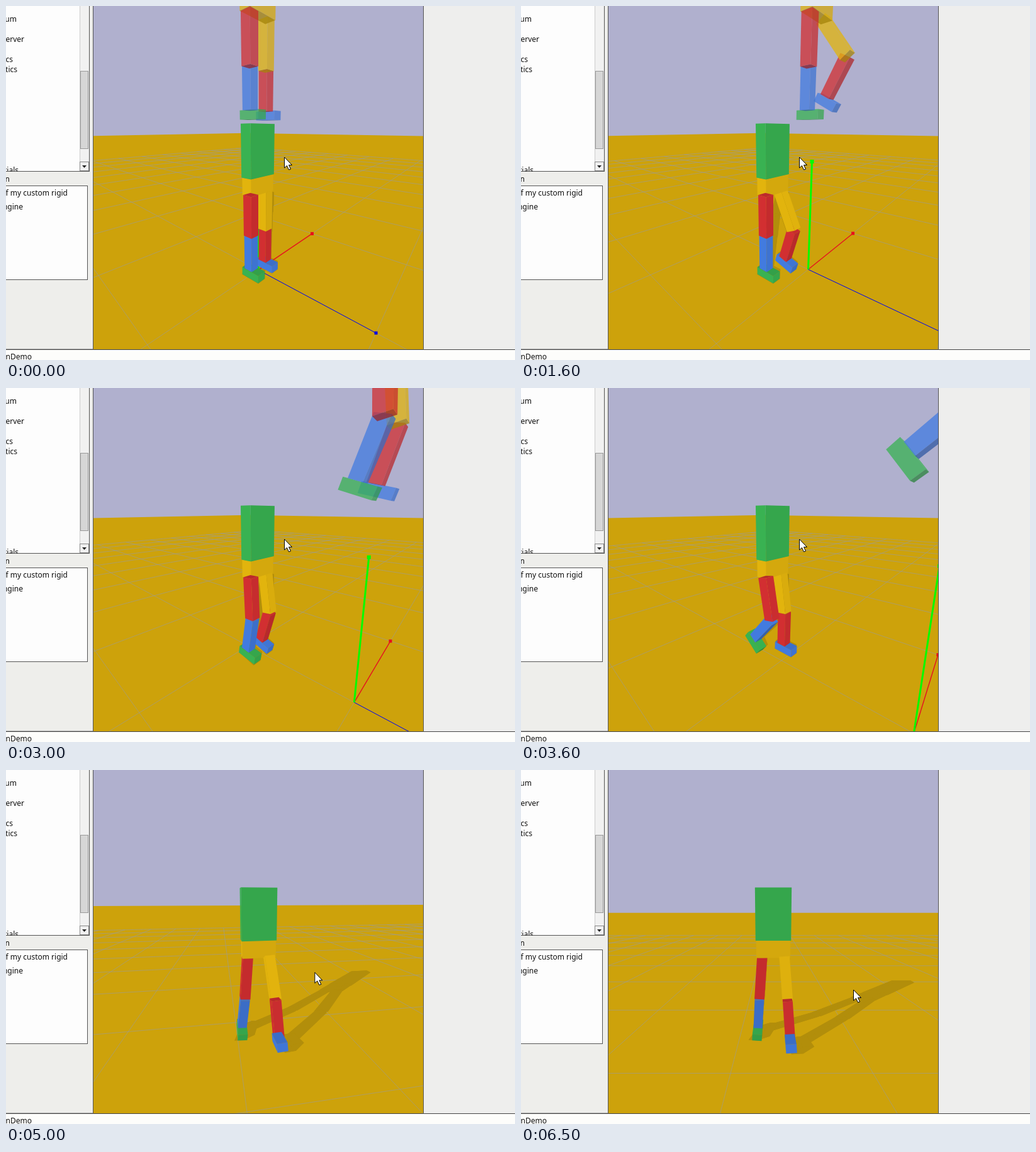
An HTML page with a canvas for the animation above (6600 ms loop, 809 px wide and 562 px high).

```html
<!DOCTYPE html>
<html lang="en">
<head>
<meta charset="utf-8">
<title>Walker simulation</title>
<style>
html, body { margin: 0; width: 100%; height: 100%; overflow: hidden; background: #eeeeeb; }
canvas { display: block; }
</style>
</head>
<body>
<canvas id="stage" width="809" height="562"></canvas>
<script>
const ctx = document.getElementById('stage').getContext('2d');
const RED = [203, 45, 47], BLUE = [64, 119, 216], GREEN = [55, 172, 79], YELLOW = [219, 174, 13];
const FOCAL = 365, NEAR = .3, LAST = 62, RAD = Math.PI / 180;
const GHOST_HEIGHT = 1.34;
const LIGHT = [-.71, .45, .54];

// Key points, each led by its step number: camera yaw, pitch and pointer; walker x and z.
const VIEW = [[35, 48.3, 11.9, 442, 240], [41, 28, 13.9, 415, 266], [50, 0, 8.4, 528, 349]];
const PLACE = [[0, 0, 0], [13, -.22, -.235], [21, -.061, -.588], [33, .045, -1.135],
  [53, .25, -2], [62, .3, -2.45]];

const clamp = v => Math.min(1, Math.max(0, v));
const bell = (n, middle, width) => Math.exp(-(((n - middle) / width) ** 2));
const add = (a, b) => a.map((v, i) => v + b[i]);

function at(rows, n) {
  const i = rows.findIndex(r => r[0] > n);
  if (i <= 0) return rows[i ? rows.length - 1 : 0].slice(1);
  const a = rows[i - 1], b = rows[i], k = (n - a[0]) / (b[0] - a[0]);
  return a.slice(1).map((v, j) => v + (b[j + 1] - v) * k);
}

function path(points) {
  ctx.beginPath();
  points.forEach(p => ctx.lineTo(p[0], p[1]));
}

function fill(points, color) {
  path(points);
  ctx.closePath();
  ctx.fillStyle = color;
  ctx.fill();
}

function stroke(points, color, width) {
  path(points);
  ctx.strokeStyle = color;
  ctx.lineWidth = width;
  ctx.stroke();
}

function box(x, y, w, h, color, edge) {
  ctx.fillStyle = color;
  ctx.fillRect(x, y, w, h);
  if (!edge) return;
  ctx.strokeStyle = edge;
  ctx.lineWidth = 1;
  ctx.strokeRect(x + .5, y + .5, w - 1, h - 1);
}

// The camera orbits a point in the walker's body.
function makeCamera(n, [px, pz]) {
  const [yaw, pitch] = at(VIEW, n);
  const cy = Math.cos(yaw * RAD), sy = Math.sin(yaw * RAD);
  const cp = Math.cos(pitch * RAD), sp = Math.sin(pitch * RAD);
  const eye = ([x, y, z]) => {
    const a = x - px, c = z - pz;
    const far = 1.929 * cp + a * sy - c * cy, down = .868 + 1.929 * sp - y;
    return [a * cy + c * sy, down * cp - far * sp, far * cp + down * sp];
  };
  // Projects a chain of points, cut at the near plane.
  const project = (points, closed) => {
    const p = points.map(eye), out = [];
    p.forEach((a, i) => {
      if (a[2] >= NEAR) out.push(a);
      const b = p[(i + 1) % p.length];
      if ((closed || i + 1 < p.length) && (a[2] < NEAR) !== (b[2] < NEAR)) {
        const k = (NEAR - a[2]) / (b[2] - a[2]);
        out.push(a.map((v, j) => v + (b[j] - v) * k));
      }
    });
    return out.map(([x, y, z]) => [401 + FOCAL * x / z, 272 + FOCAL * y / z]);
  };
  return { eye, project };
}

function drawGround({ project }) {
  box(139, 0, 524, 545, '#b0b0ce');
  fill(project([[-50, 0, -50], [50, 0, -50], [50, 0, 50], [-50, 0, 50]], true), '#cda20b');
  ctx.globalAlpha = .65;
  for (let i = -10; i <= 10; i++) {
    stroke(project([[i, 0, -10], [i, 0, 10]]), '#9c9c96', 1);
    stroke(project([[-10, 0, i], [10, 0, i]]), '#9c9c96', 1);
  }
  ctx.globalAlpha = 1;
}

function drawAxes({ project }) {
  const axis = (end, color, width, dot) => {
    stroke(project([[0, 0, 0], end]), color, width);
    const tip = project([end])[0];
    if (tip) box(tip[0] - dot / 2, tip[1] - dot / 2, dot, dot, color);
  };
  axis([1, 0, 0], '#e8101a', 1.4, 5);
  axis([0, 0, 1], '#0000e0', 1, 5);
  axis([0, 1, 0], '#00ff00', 3, 6);
}

// Swings a point forward about x, then sideways about z.
function turn(swing, lean) {
  const cs = Math.cos(swing * RAD), ss = Math.sin(swing * RAD);
  const cl = Math.cos(lean * RAD), sl = Math.sin(lean * RAD);
  return ([x, y, z]) => {
    const h = y * cs + z * ss;
    return [x * cl - h * sl, x * sl + h * cl, z * cs - y * ss];
  };
}

// A block is its eight corners; bits 0 to 2 of the index select the side on x, y and z.
function block(joint, rotate, middle, size, color) {
  const corners = Array.from({ length: 8 }, (_, i) =>
    add(joint, rotate(middle.map((m, k) => m + size[k] * ((i >> k & 1) - .5)))));
  return { corners, color };
}

function faces({ corners }) {
  const list = [];
  for (let k = 0; k < 3; k++) {
    const u = 1 << (k + 1) % 3, v = 1 << (k + 2) % 3, w = 1 << k;
    list.push([0, v, u + v, u], [w, w + u, w + u + v, w + v]);
  }
  return list.map(f => f.map(i => corners[i]));
}

function leg(base, side, swing, shin, spread, colors) {
  const upper = turn(swing, spread * side), lower = turn(shin, spread * side);
  const hip = add(base, [.093 * side, .735, 0]);
  const knee = add(hip, upper([0, -.36, 0])), ankle = add(knee, lower([0, -.31, 0]));
  return [
    block(hip, upper, [0, -.18, 0], [.085, .36, .09], colors[0]),
    block(knee, lower, [0, -.155, 0], [.08, .31, .085], colors[1]),
    block(ankle, lower, [0, -.035, .025], [.085, .07, .19], colors[2])
  ];
}

// The whole figure; gain exaggerates the stride.
function figure(n, base, gain) {
  const start = clamp(n / 10), late = clamp((n - 33) / 8);
  const rightHip = start * (18 + 13 * Math.cos((n - 17) * Math.PI / 13));
  const rightShin = 8 * late - 53 * bell(n, 20, 6.5);
  const leftHip = 11 * bell(n, 33, 5);
  const leftShin = -40 * bell(n, 33, 5) - 15 * late;
  const still = turn(0, 0);
  return [
    block(base, still, [0, 1.093, 0], [.29, .425, .105], GREEN),
    block(base, still, [0, .808, 0], [.28, .145, .1], YELLOW),
    ...leg(base, -1, leftHip * gain, leftShin * gain, 4 * late, [RED, BLUE, GREEN]),
    ...leg(base, 1, rightHip * gain, rightShin * gain, 4 * late, [YELLOW, RED, BLUE])
  ];
}

function shade([a, b, c], color) {
  const p = b.map((v, i) => v - a[i]), q = c.map((v, i) => v - b[i]);
  const normal = [0, 1, 2].map(i => p[(i + 1) % 3] * q[(i + 2) % 3] - p[(i + 2) % 3] * q[(i + 1) % 3]);
  const dot = normal.reduce((sum, v, i) => sum + v * LIGHT[i], 0) / Math.hypot(...normal);
  const level = .75 + .4 * Math.max(0, dot);
  return `rgb(${color.map(v => Math.round(v * level))})`;
}

function drawFigure(blocks, { eye, project }) {
  const depth = ({ corners: c }) => eye(c[0])[2] + eye(c[7])[2];
  blocks.sort((a, b) => depth(b) - depth(a));
  for (const part of blocks) for (const face of faces(part)) {
    const flat = project(face, true);
    const area = flat.reduce((sum, p, i) => {
      const q = flat[(i + 1) % flat.length];
      return sum + p[0] * q[1] - q[0] * p[1];
    }, 0);
    if (area < 0) fill(flat, shade(face, part.color));
  }
}

function drawShadow(blocks, { project }) {
  const drop = ([x, y, z]) => [x + 1.56 * y, 0, z - 1.2 * y];
  for (const part of blocks)
    for (const face of faces(part)) fill(project(face.map(drop), true), '#b28e0b');
}

function drawPointer(n) {
  const [, , x, y] = at(VIEW, n);
  const shape = [[0, 0], [0, 17], [4, 13.5], [7, 20], [10, 19], [7, 12.5], [12, 12.5], [0, 0]]
    .map(p => [p[0] + x + .5, p[1] + y]);
  fill(shape, '#fff');
  stroke(shape, '#000', 1);
}

function drawWindow() {
  const edge = '#555';
  box(0, 0, 138, 546, '#eeeeeb');
  box(664, 0, 145, 546, '#eeeeed');
  box(0, 546, 809, 16, '#fdfdfb');
  box(0, 0, 117, 262, '#fdfdfd');
  box(117, 0, 15, 262, '#f1f1f1');
  box(132, 0, 1, 263, edge);
  box(117, 0, 1, 262, '#ccc');
  box(118, 103, 13, 124, '#d6d6d6', '#999');
  box(117, 247, 15, 15, '#f0f0f0', '#888');
  fill([[121, 253], [128, 253], [124.5, 257]], '#222');
  box(-1, 285, 131, 150, '#fdfdfd', edge);

  ctx.font = '12px "Noto Sans", "Open Sans", sans-serif';
  ctx.textAlign = 'right';
  ctx.fillStyle = '#111';
  const text = (label, right, base) => ctx.fillText(label, right, base);
  text('um', 17, 25);
  text('Server', 29, 57);
  text('cs', 11, 89);
  text('tics', 18, 105);
  text('rials', 20, 265);
  box(0, 262, 132, 10, '#eeeeeb');
  box(0, 262, 133, 1, edge);
  ctx.fillStyle = '#111';
  text('n', 6, 279);
  text('f my custom rigid', 98, 301);
  text('ngine', 27, 323);
  text('inDemo', 41, 561);

  box(0, 544, 138, 1, '#aaa');
  box(0, 545, 809, 1, '#444');
  box(138, 0, 1, 546, edge);
  box(663, 0, 1, 546, edge);
}

function draw(now) {
  const n = Math.min(LAST, Math.max(0, Math.floor(now % 6600 / 100) - 3));
  const [x, z] = at(PLACE, n), camera = makeCamera(n, [x, z]);
  const walker = figure(n, [x, 0, z], 1);
  const ghost = figure(n && n + 1, [0, GHOST_HEIGHT, 0], 1.3);
  drawWindow();
  ctx.save();
  ctx.beginPath();
  ctx.rect(139, 0, 524, 545);
  ctx.clip();
  drawGround(camera);
  drawShadow(walker, camera);
  drawAxes(camera);
  ctx.globalAlpha = .75;
  drawFigure(ghost, camera);
  ctx.globalAlpha = 1;
  drawFigure(walker, camera);
  drawPointer(n);
  ctx.restore();
}

function tick() {
  draw(performance.now());
  requestAnimationFrame(tick);
}
tick();
</script>
</body>
</html>
```
